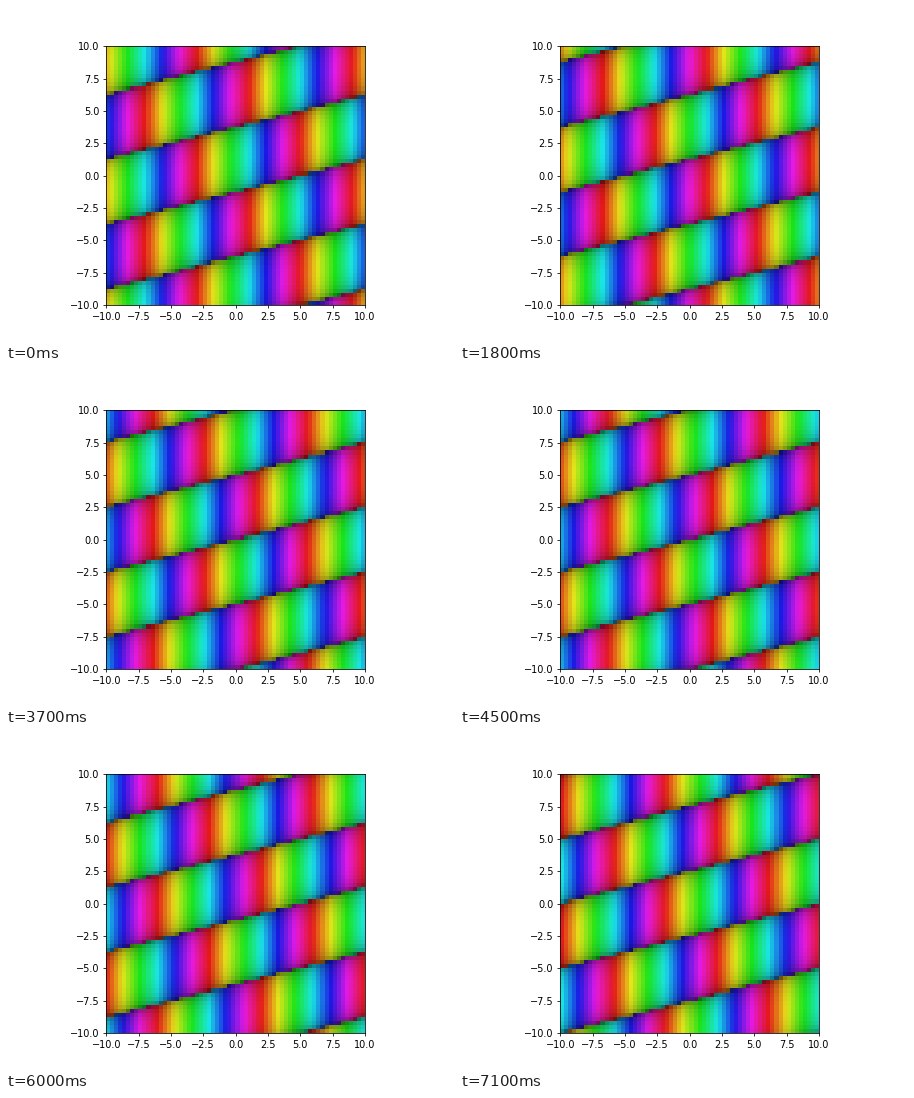
These frames come from a looping animation (448x336 px, 7200 ms). A matplotlib script:

```python
import numpy as np
import matplotlib.pyplot as plt
from matplotlib.animation import FuncAnimation

CELLS = 64
HALF = 10
FRAMES = 72
INTERVAL = 100
DRIFT = 0.004 * np.pi  # carrier phase lost per frame
BEAT = np.pi / 4       # envelope phase gained per frame

axis = -HALF + 2 * HALF * (np.arange(CELLS) + 0.5) / CELLS
x, y = np.meshgrid(axis, axis)


def wave(n):
    """Sum of two plane waves, written as carrier times envelope."""
    carrier = np.pi / 4 * (x + 3) - DRIFT * n
    envelope = np.pi / 10 * (0.5 * x - 2 * y) + BEAT * (n + 1)
    return 0.5 * (np.exp(1j * (carrier + envelope))
                  + np.exp(1j * (carrier - envelope)))


def colorize(z, saturation=0.8):
    """Phase becomes hue and magnitude becomes lightness (HLS)."""
    hue = np.angle(z) / (2 * np.pi) % 1
    light = 1 - 1 / (1 + np.abs(z) ** 0.3)
    chroma = saturation * np.minimum(light, 1 - light)

    def channel(offset):
        k = (offset + 12 * hue) % 12
        return light - chroma * np.clip(np.minimum(k - 3, 9 - k), -1, 1)

    return np.clip(np.dstack([channel(o) for o in (0, 8, 4)]), 0, 1)


fig, ax = plt.subplots(figsize=(6.4, 4.8), dpi=70)
image = ax.imshow(colorize(wave(0)), origin="lower", interpolation="nearest",
                  extent=(-HALF, HALF, -HALF, HALF))
ticks = np.arange(-HALF, HALF + 0.1, 2.5)
ax.set_xticks(ticks)
ax.set_yticks(ticks)


def update(n):
    image.set_data(colorize(wave(n)))
    return [image]


anim = FuncAnimation(fig, update, frames=FRAMES, interval=INTERVAL,
                     repeat=True, repeat_delay=0)
plt.show()
```
